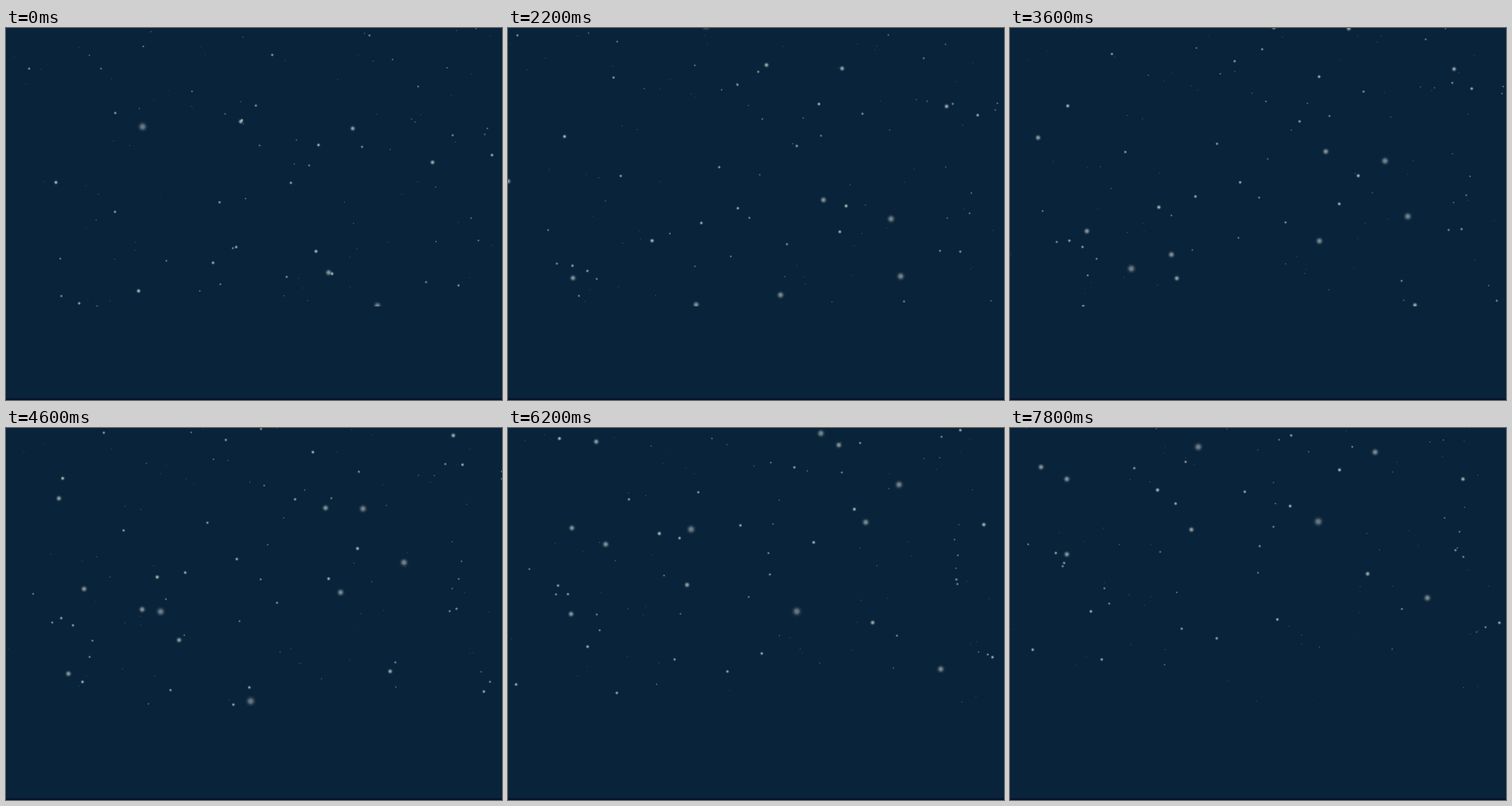
Animation, 864 px wide and 648 px high, one loop 8000 ms. Source, as an HTML page with a canvas:

```html
<!DOCTYPE html>
<html lang="en">
<head>
<meta charset="utf-8">
<title>Drifting stars</title>
<style>
  html, body { margin: 0; width: 100%; height: 100%; overflow: hidden; background: #08233a; }
  canvas { display: block; width: 100vw; height: 100vh; }
</style>
</head>
<body>
<canvas id="sky" width="864" height="648"></canvas>
<script>
const ctx = document.getElementById('sky').getContext('2d');
const LOOP = 8000, STEP = 200;
const SKY_HEIGHT = 485;

// Pace of the drift: [step, progress], progress running from 0 to 60.
const PACE = [[0, 0], [4, 5], [18, 25], [23, 34], [39, 60]];

// Near stars at mid-loop: x, y, rise, drift, bend (per half loop).
const NEAR = [
  [638, 181, 303, -108, -99], [565, 324, 282, 144, -73], [777, 39, 195, 18, -16],
  [494, -180, 352, 340, 84], [553, 173, 253, 23, 32], [611, 231, 158, 17, -54],
  [568, 282, 146, -40, -40], [601, -34, 209, 79, 82], [459, -34, 197, -15, -65],
  [100, 109, 160, -7, -20], [262, 283, 175, 13, -18], [137, 313, 245, 4, -87],
  [257, 351, 262, -147, -11], [246, 364, 331, 190, -108], [394, 524, 361, 257, -114],
  [73, 153, 228, 144, -3], [684, 450, 196, -119, 58], [694, 276, 313, 0, -40],
  [297, 399, 222, 36, -17], [106, 460, 240, 25, -32], [789, 582, 286, -62, 0],
  [881, 272, 183, -92, 0]
];

let seed = 41;
function random(min, max) {
  seed = (seed * 16807) % 2147483647;
  return min + (max - min) * seed / 2147483647;
}

// Far stars are slower, smaller and dimmer.
const FAR = Array.from({ length: 155 }, () => {
  const rise = 38 + 105 * random(0, 1) ** 2;
  const sway = rise / 3;
  return [random(-30, 894), random(-110, 595), rise, random(-sway, sway), random(-sway, sway) / 2];
});

function progressAt(step) {
  const i = Math.max(1, PACE.findIndex(([s]) => s >= step));
  const [s0, p0] = PACE[i - 1], [s1, p1] = PACE[i];
  return p0 + (p1 - p0) * (step - s0) / (s1 - s0);
}

function drawStar([x, y, rise, drift, bend], s) {
  const cx = x + drift * s + bend * s * s;
  const cy = y - rise * s;
  const radius = Math.max(1.4, rise / 36);
  const alpha = 0.8 * Math.min(rise / 150, (170 / rise) ** 0.7, 1);
  const glow = ctx.createRadialGradient(cx, cy, 0, cx, cy, radius);
  const stop = (at, a) => glow.addColorStop(at, `rgba(232,232,224,${a})`);
  stop(0, alpha);
  stop(0.35, alpha * 0.75);
  stop(0.65, alpha * 0.22);
  stop(1, 0);
  ctx.fillStyle = glow;
  ctx.fillRect(cx - radius, cy - radius, radius * 2, radius * 2);
}

function draw(time) {
  const step = Math.floor((time % LOOP) / STEP);
  const s = progressAt(step) / 30 - 1;
  ctx.fillStyle = '#08233a';
  ctx.fillRect(0, 0, 864, 648);
  ctx.fillStyle = '#04142c';
  ctx.fillRect(0, 645, 864, 3);
  ctx.save();
  ctx.beginPath();
  ctx.rect(0, 0, 864, SKY_HEIGHT);
  ctx.clip();
  for (const star of FAR) drawStar(star, s);
  for (const star of NEAR) drawStar(star, s);
  ctx.restore();
}

const start = performance.now();
function tick() {
  draw(performance.now() - start);
  requestAnimationFrame(tick);
}
tick();
</script>
</body>
</html>
```
